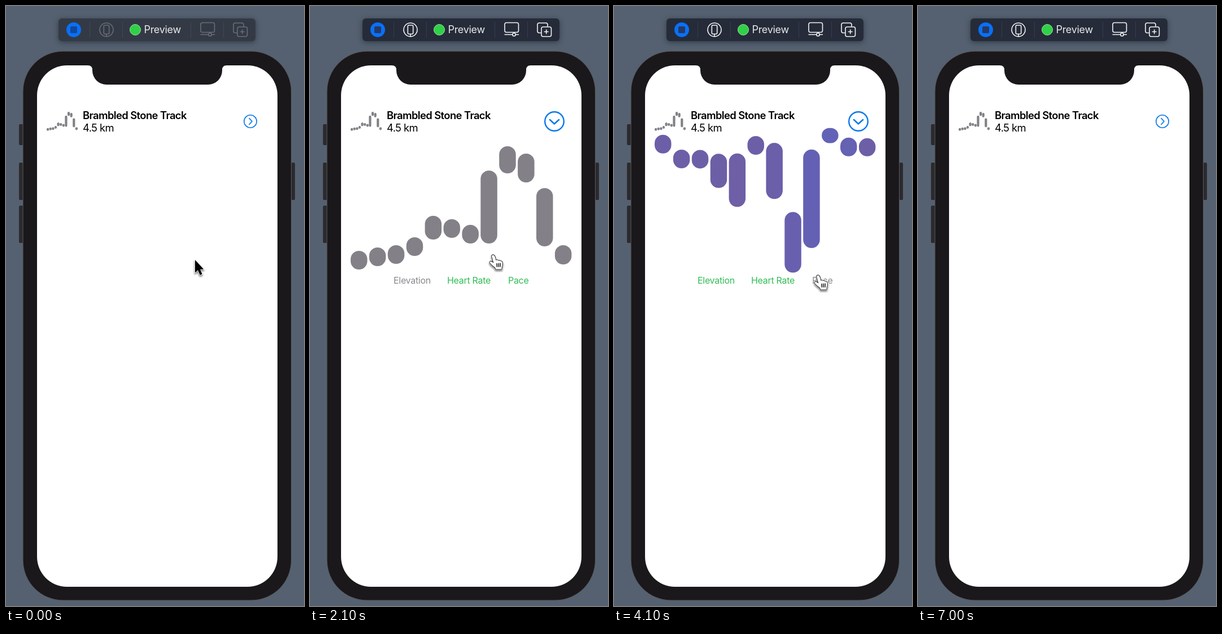
Recreate the animation shown at these times as an HTML page with a canvas. Size 528 by 1061 pixels, loop 7.1 s.

```html
<!DOCTYPE html>
<html lang="en">
<head>
<meta charset="utf-8">
<title>Trail chart</title>
<style>
html, body { margin: 0; width: 100%; height: 100%; overflow: hidden; background: #556170; }
canvas { display: block; width: 528px; height: 1061px; }
</style>
</head>
<body>
<canvas id="stage" width="528" height="1061"></canvas>
<script>
const ctx = document.getElementById('stage').getContext('2d');
const LOOP = 7100, STEP = 100;
const OPEN = 0.848, CLOSE = 5.753, ACTIVE = 0.9;
const FONT = 'Inter, "Liberation Sans", sans-serif';

// Each chart: one colour, and the top and bottom of every bar
const charts = {
  elevation: { rgb: [131, 129, 135],
    top: [433, 427, 423, 409, 371, 377, 387, 291, 248, 261, 322, 423],
    end: [466, 460, 456, 442, 413, 410, 420, 420, 296, 312, 425, 457] },
  heart: { rgb: [168, 77, 78],
    top: [433, 431, 414, 396, 361, 368, 398, 301, 248, 311, 372, 388],
    end: [466, 464, 447, 437, 404, 401, 431, 403, 315, 389, 409, 421] },
  pace: { rgb: [108, 95, 168],
    top: [228, 253, 252, 258, 258, 228, 245, 360, 253, 229, 229, 230],
    end: [261, 286, 285, 319, 354, 261, 343, 467, 415, 263, 262, 262] }
};
// lag shifts the last two bars
const switches = [
  { at: 2.515, to: 'heart', tab: 1, lag: 0 },
  { at: 3.67, to: 'pace', tab: 2, lag: -0.2 },
  { at: 4.45, to: 'heart', tab: 1, lag: 0.25 }
];
const tabs = [['Elevation', 148], ['Heart Rate', 243], ['Pace', 351]];
// Pointer tip: time, x, y
const route = [
  [0, 335, 449], [0.3, 385, 330], [0.6, 442, 222], [0.8, 431, 208], [1.4, 430, 208],
  [1.7, 420, 260], [2.1, 325, 440], [2.4, 286, 504], [2.55, 295, 484], [2.8, 295, 482],
  [3.1, 308, 488], [3.3, 345, 498], [3.5, 362, 482], [4.1, 362, 476], [4.35, 318, 486],
  [4.8, 318, 486], [5, 371, 428], [5.3, 420, 270], [5.6, 436, 211], [5.9, 436, 210],
  [6.1, 452, 228], [6.25, 470, 262], [6.4, 435, 326]
];

const mix = (a, b, p) => a + (b - a) * p;
const clamp = v => Math.max(0, Math.min(1, v));
const ease = v => { v = clamp(v); return v * v * (3 - 2 * v); };

// Underdamped spring response, damping 0.5
function spring(s) {
  if (s <= 0) return 0;
  const w = 22.85, d = w * Math.sqrt(0.75);
  return 1 - Math.exp(-w / 2 * s) * (Math.cos(d * s) + Math.sin(d * s) / Math.sqrt(3));
}

function box(x, y, w, h, r, fill, stroke, line = 1) {
  ctx.beginPath();
  ctx.roundRect(x, y, w, h, r);
  paint(fill, stroke, line);
}
function disc(x, y, r, fill, stroke, line = 1) {
  ctx.beginPath();
  ctx.arc(x, y, r, 0, Math.PI * 2);
  paint(fill, stroke, line);
}
function paint(fill, stroke, line) {
  if (fill) { ctx.fillStyle = fill; ctx.fill(); }
  if (stroke) { ctx.strokeStyle = stroke; ctx.lineWidth = line; ctx.stroke(); }
}
function path(d, stroke, line, fill) {
  const p = new Path2D(d);
  if (stroke) { ctx.strokeStyle = stroke; ctx.lineWidth = line; ctx.stroke(p); }
  if (fill) { ctx.fillStyle = fill; ctx.fill(p); }
}
function text(str, x, y, size, weight, color, gap) {
  ctx.font = `${weight} ${size}px ${FONT}`;
  ctx.letterSpacing = gap + 'px';
  ctx.fillStyle = color;
  ctx.fillText(str, x, y);
}
function shadow(color, blur, y) {
  ctx.shadowColor = color;
  ctx.shadowBlur = blur;
  ctx.shadowOffsetY = y;
}

function toolbar(on) {
  const ink = on ? '#f2f3f5' : '#686d77';
  ctx.save();
  shadow('rgba(20,26,36,.55)', 10, 2);
  box(93, 22, 349, 40, 6, on ? '#252b38' : '#343a45');
  ctx.restore();
  for (const x of [148.5, 206.5, 327.5, 385.5])
    path(`M${x} 28V56`, on ? '#363c49' : '#434954', 1);
  disc(120, 42, 13, '#0870f8');
  box(114, 36, 12, 12, 2, on ? '#243a63' : '#12479c');
  disc(178, 42, 12, null, ink, 1.6);
  box(173.3, 34, 9.4, 15.5, 2, null, ink, 1.6);
  path('M178 49.5V54', ink, 1.6);
  disc(229, 42, 9.5, '#30d146', '#93dfa0', 1);
  text('Preview', 244.5, 48, 18, 400, '#e7e8eb', -0.3);
  box(345, 29.5, 24.5, 17, 3, null, ink, 1.6);
  path('M344.5 50.5H358.5M364.5 50.5H370', ink, 1.6);
  disc(361.5, 50.5, 2.7, null, ink, 1.6);
  path('M409.5 47.5H406A3 3 0 0 1 403 44.5V33A3 3 0 0 1 406 30H418A3 3 0 0 1 421 33V36.5', ink, 1.6);
  box(410, 37, 17.5, 17, 3, null, ink, 1.6);
  path('M418.7 41.5V49.5M414.7 45.5H422.7', ink, 1.6);
}

function phone() {
  for (const [x, y, h] of [[23, 209, 37], [23, 277, 66], [23, 353, 66], [504, 277, 66]])
    box(x, y, 8, h, 2, '#2b2a2d');
  box(30, 80, 475.5, 971, 71, '#1a181b', '#59595e', 1);
  box(55, 105, 426, 922, 53, '#fff');
  path('M145 104H391V105Q383 105 383 113V114A25 25 0 0 1 358 139H178A25 25 0 0 1 153 114V113Q153 105 145 105Z',
    null, 0, '#1a181b');
}

function header(t) {
  const e = charts.elevation;
  e.top.forEach((y, i) => box(72 + i * 4.62, 187 + (y - 248) * 0.155, 4.2,
    (e.end[i] - y) * 0.155, 2.1, '#838187'));
  text('Brambled Stone Track', 136, 200, 18.4, 600, '#000', -0.6);
  text('4.5 km', 136, 222, 18.4, 400, '#000', -0.6);

  const open = ease((t - OPEN) / 0.35) - ease((t - CLOSE) / 0.35);
  const dim = c => t > c - 0.1 && t < c + 0.35 ? mix(0.4, 1, clamp((t - c) / 0.3)) : 1;
  ctx.save();
  ctx.globalAlpha = dim(OPEN) * dim(CLOSE);
  ctx.translate(433, 204);
  ctx.rotate(open * Math.PI / 2);
  ctx.scale(1 + open / 2, 1 + open / 2);
  ctx.lineCap = ctx.lineJoin = 'round';
  disc(0, 0, 11.2, null, '#0a78ee', 1.6);
  path('M-2 -5.4L3 0L-2 5.4', '#0a78ee', 1.7);
  ctx.restore();
}

function bar(i, t) {
  const first = charts.elevation;
  let top = first.top[i], end = first.end[i], rgb = first.rgb;
  for (const s of switches) {
    const c = charts[s.to], age = t - s.at - i * 0.03;
    const p = spring(age - (i > 9 ? s.lag : 0));
    const q = spring(age - (i > 10 ? s.lag : 0));
    top = mix(top, c.top[i], p);
    end = mix(end, c.end[i], p);
    rgb = rgb.map((v, k) => mix(v, c.rgb[k], q));
  }
  const enter = spring(t - OPEN - i * 0.03);
  ctx.save();
  ctx.globalAlpha *= clamp(enter);
  box(72 + i * 32.9 + 385 * (1 - enter), top, 29.5, Math.max(1, end - top), 14.75,
    `rgb(${rgb.map(Math.round)})`);
  ctx.restore();
}

function detail(t) {
  const gone = ease((t - CLOSE) / 0.35);
  if (t < OPEN || gone >= 1) return;
  ctx.save();
  ctx.beginPath();
  ctx.rect(55, 105, 426, 922);
  ctx.clip();
  ctx.globalAlpha = 1 - gone;
  ctx.translate(268, 370);
  ctx.scale(1 - gone, 1 - gone);
  ctx.translate(-268, -370);
  for (let i = 0; i < 12; i++) bar(i, t);

  const enter = ease((t - OPEN) / 0.35);
  const past = switches.filter(s => t >= s.at);
  const chosen = past.length ? past[past.length - 1].tab : 0;
  ctx.globalAlpha *= enter;
  tabs.forEach(([name, x], i) => text(name, x + 392 * (1 - enter), 490.5, 16, 400,
    i === chosen ? '#8a8a8f' : '#31bd55', -0.3));
  ctx.restore();
}

function pointer(t) {
  if (t > 6.45) return;
  let k = 0;
  while (k < route.length - 2 && route[k + 1][0] <= t) k++;
  const [t0, x0, y0] = route[k], [t1, x1, y1] = route[k + 1];
  const p = ease((t - t0) / (t1 - t0));
  ctx.save();
  ctx.translate(mix(x0, x1, p), mix(y0, y1, p));
  ctx.lineJoin = ctx.lineCap = 'round';
  shadow('rgba(0,0,0,.4)', 3, 2);
  if (t < 0.8) {
    path('M0 0V22.5L5 17.8L8.8 26.5L12.5 25L8.8 16.5H15.3Z', '#fff', 3, '#000');
  } else {
    const hand = 'M-3 2.5Q-2.5 -.5 .2 .3Q2 1 2.7 3.5L4.6 10Q6.7 8 8.2 10.3Q10.5 8.8 12 11.3' +
      'Q14.5 10.2 15.6 13Q17 17 15 21L14.5 25.5H4L3 22.5Q-2 19 -5.5 15.2' +
      'Q-7.5 12.5 -5.3 11.5Q-3.5 11 .3 14.6Z';
    path(hand, '#fff', 3.5, '#fff');
    ctx.shadowColor = 'transparent';
    path(hand, '#000', 1.7, '#fff');
    path('M6 15.5L6.4 21M9 15.3L9.2 21M12 15V21', '#000', 1.4);
  }
  ctx.restore();
}

function draw(now) {
  const t = Math.floor(now % LOOP / STEP) * STEP / 1000;
  ctx.fillStyle = '#556170';
  ctx.fillRect(0, 0, 528, 1061);
  toolbar(t >= ACTIVE);
  phone();
  header(t);
  detail(t);
  pointer(t);
}

let start;
function tick(now) {
  start ??= now;
  draw(now - start);
  requestAnimationFrame(tick);
}
requestAnimationFrame(tick);
</script>
</body>
</html>
```
